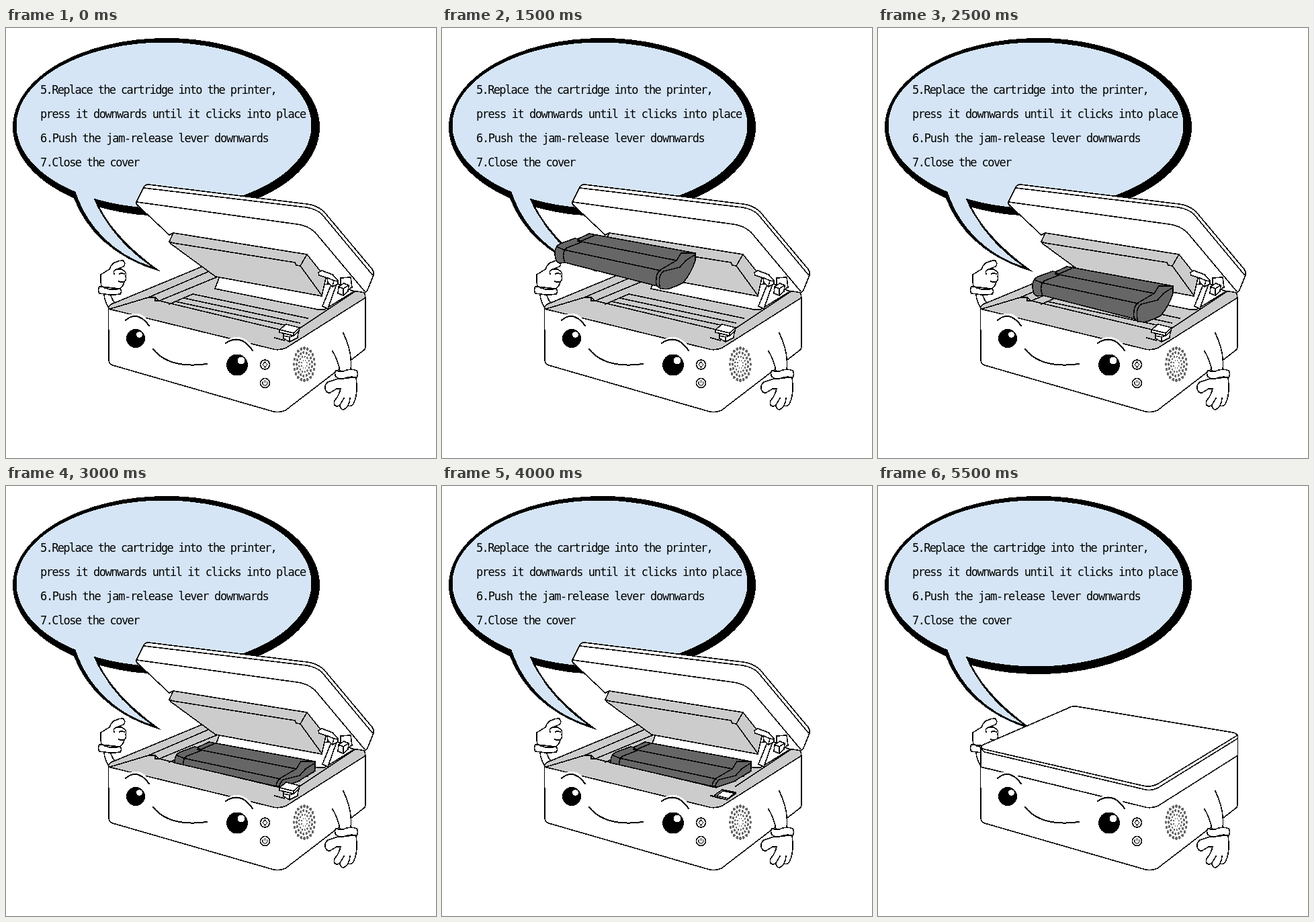
Write an HTML page that moves like this. It is 640 px wide and 640 px high and loops after 7.5 s.

```html
<!DOCTYPE html>
<html lang="en">
<head>
<meta charset="utf-8">
<title>Replacing the cartridge</title>
<style>
html, body { margin: 0; width: 100%; height: 100%; overflow: hidden; background: #fff; }
svg { display: block; width: 100vw; height: 100vh; shape-rendering: crispEdges; }
path, circle { fill: none; stroke: #000; stroke-width: 1.6; stroke-linejoin: round; stroke-linecap: round; }
.w { fill: #fff; }
.g { fill: #ccc; }
.d { fill: #666; }
.k { fill: #000; }
.flat { stroke: none; }
.sky { fill: #d5e5f5; stroke: none; }
.halo { stroke: #fff; stroke-width: 7; }
.brow { stroke-width: 2; }
.thin { stroke-width: 1; }
text { font: 17px "DejaVu Sans Mono", "Liberation Mono", monospace; fill: #000; }
</style>
</head>
<body>
<svg viewBox="0 0 640 640">
  <defs>
    <clipPath id="slot"><path d="M240 370H472V419L434 440L410 448L398 446L251 412L240 410Z"/></clipPath>
  </defs>

  <g id="bubble">
    <ellipse cx="238.5" cy="147.5" rx="228.5" ry="132.5"/>
    <path class="k flat" d="M97 242C112 291 151 340 231 363C190 334 157 301 140 268L128 252Z"/>
    <ellipse cx="235" cy="145" rx="219.5" ry="123.5" fill="#d5e5f5"/>
    <path class="sky" d="M101 238L104 245C118 289 155 335 216 355C174 326 146 290 130 253L132 240Z"/>
  </g>
  <g id="words"></g>

  <g id="leftArm">
    <path class="w flat" d="M146 396Q147 408 153 416L165 411Q158 403 157 396Z"/>
    <path d="M146 397Q147 407 152 415M156 398Q158 405 163 411"/>
    <path class="w" d="M142 385Q140 376 141 367L154 359Q157 351 162 349Q168 346 174 346Q179 350 175 355L163 360Q171 357 175 361Q180 364 178 370Q180 374 176 378Q175 384 169 388Z"/>
    <path d="M163 360Q159 362 161 366M176 366Q172 364 169 366M176 378Q171 379 168 377"/>
    <path class="w" d="M139 385Q144 384 147 387Q158 391 170 388Q173 392 170 396Q157 398 147 396L139 395Q136 390 139 385Z"/>
  </g>

  <path class="w" d="M152.500 418L153 494Q153 500 159 502L393 569.500Q405 574 416 569L532 480Q535 478 535 474V401L417 476Q405 481 394 477Z"/>

  <g id="open">
    <path class="g" d="M152.500 418Q152 414 157 411L297 353L318 369L520 392L531 393Q536 396 534 402L417 476Q405 481 394 477Z"/>
    <path d="M155 418L212 401L305 361M212 401H222L228 406L318 369M222 401V406H228"/>
    <path class="w" d="M318 370L311 388L464 419L474 419L518 392L496 378L462 384Z"/>
    <path class="g flat" d="M311 388L464 419L439 438L300 400Z"/>
    <path d="M228 406L408 449M243 411L278 396L449 432M252 407L419 443M265 402L437 439M311 388L464 419M518 393L437 447M400 461L414 465"/>

    <path class="w" d="M194 259L205 237Q207 233 212 233L448 262Q463 264 473 273L545 359Q548 363 547 368L538 390Q535 395 529 393L515 391L475 372L448 337L247 306L243 308L196 264Q193 262 194 259Z"/>
    <path d="M205 238L447 267Q461 269 470 277L545 367M195 259L433 292Q449 294 460 304L533 391"/>
    <path class="g" d="M249 305L448 337L476 372L470 399L312 370L245 321L243 318Z"/>
    <path d="M243 318L249 320L430 349L432 353L438 354L448 337M438 354L470 398"/>

    <path class="w" d="M484 382L471 414L479 418L491 384Z"/>
    <path class="w" d="M465 364L470 361L486 367L494 376V381L486 385L479 379L478 372L466 368Z"/>
    <path d="M479 372L488 376L494 377M488 376L486 384"/>
    <path class="w" d="M498 372L513 371L515 386L508 390L498 384Z"/>
    <path class="w" d="M495 385L503 380L510 383L509 392L502 398L494 395Z"/>
    <path d="M495 385L502 388L510 383M502 388V397"/>
  </g>

  <g id="cartSlot"><g id="cart">
    <path class="d" d="M105 301Q106 296 112 293L134 285L138 286L155 278L313 307V318Q307 337 295 351Q284 357 274 360Q262 362 256 356L119 321L111 322Q105 320 105 314Q103 307 105 301Z"/>
    <path d="M119 321Q113 307 122 299L143 291L138 286M108 298L117 302L261 333M138 289L285 318M162 281L141 290M255 355Q253 338 261 332L285 318L292 307L313 307M261 360Q256 341 266 334L290 328L299 318L313 309"/>
  </g></g>
  <path id="rim" d="M251 412L398 446L410 448L434 440L460 424"/>

  <g id="leverUp">
    <path class="w" d="M413 454V462L422 467L434 461L435 452L424 448Z"/>
    <path class="w" d="M407 449L417 441L437 446L436 451L428 458L407 453Z"/>
    <path d="M407 449L428 454L437 446M428 454V458M413 458L422 460V467M422 460L428 458"/>
  </g>
  <g id="leverDown">
    <path class="w" d="M406 460L417 452L437 456L426 465Z"/>
    <path d="M402 461L424 467L437 458M410 460L418 454L434 457"/>
  </g>
  <path id="click" d="M434 446L432 410M440 448L469 416M444 453L475 451"/>

  <g id="closed">
    <path class="w" d="M153 418V390Q153 387 157 385L282 331Q288 327 295 328L529 367Q535 369 535.500 373V401L417 476Q405 481 394 477Z"/>
    <path d="M154 388Q154 391 159 392L394 446Q406 449 417 443L535 371M153 391L159 396L394 451Q406 455 417 449L535 376"/>
  </g>

  <g id="face">
    <path class="halo" d="M179 434Q196 419 213 442M328 469Q349 454 367 479"/>
    <path class="brow" d="M178 435Q196 420 213 443M327 469Q349 454 367 480"/>
    <circle class="k flat" cx="193" cy="462" r="14"/>
    <circle class="w flat" cx="198.500" cy="456.500" r="4.500"/>
    <circle class="k flat" cx="344" cy="501.500" r="16"/>
    <circle class="w flat" cx="350" cy="495" r="5.500"/>
    <path class="brow" d="M219 478C236 499 263 505 299 500"/>
    <circle cx="385.500" cy="501" r="7"/>
    <circle cx="385.500" cy="528.500" r="7"/>
    <path class="thin" d="M385.500 497L389 501L385.500 505L382 501ZM383 526A3.500 3.500 0 1 0 388 526M385.500 524V528"/>
  </g>
  <g id="speaker" fill="#666"></g>

  <g id="rightArm">
    <path class="w flat" d="M502 454Q515 480 514 511L497 512Q494 495 486 481Z"/>
    <path d="M502 454Q516 483 513 509M486 481Q494 494 497 510"/>
    <path class="w" d="M494 522L479 527Q474 531 475 537Q477 544 482 543L492 537L498 537Q496 546 491 552Q487 557 489 561Q492 565 497 561Q497 567 502 568Q507 566 509 562Q516 564 518 557Q524 545 521 520Z"/>
    <path d="M497 561Q500 556 503 551M509 562Q512 556 512 551"/>
    <path class="w" d="M491 510Q500 513 507 509Q516 507 522 510Q525 515 522 520Q512 518 505 521Q497 524 491 519Q488 514 491 510Z"/>
  </g>
</svg>
<script>
const NS = "http://www.w3.org/2000/svg";
const $ = id => document.getElementById(id);
const add = (parent, tag, attrs) => {
  const el = document.createElementNS(NS, tag);
  for (const k in attrs) el.setAttribute(k, attrs[k]);
  return parent.appendChild(el);
};

// text, baseline, letter spacing
[
  ["5.Replace the cartridge into the printer,", 98, -1.67],
  ["press it downwards until it clicks into place", 134, -1.46],
  ["6.Push the jam-release lever downwards", 170, -1.3],
  ["7.Close the cover", 206, -1.6]
].forEach(([line, y, gap]) => {
  add($("words"), "text", { x: 51, y, "letter-spacing": gap }).textContent = line;
});

// rings: x radius, y radius, dots, dot size
[[15.5, 24, 20, 1.8], [11.5, 17.5, 17, 1.6], [7.8, 11.5, 13, 1.2], [4.2, 6, 8, 0.8]]
  .forEach(([rx, ry, n, r], ring) => {
    for (let i = 0; i < n; i++) {
      const a = (i + ring / 2) / n * 2 * Math.PI;
      add($("speaker"), "ellipse", {
        cx: 444 + rx * Math.cos(a), cy: 500.5 + ry * Math.sin(a), rx: r, ry: r * 1.35
      });
    }
  });

const LOOP = 7500, SEATED = 3000, PRESSED = 3500, CLOSED = 5500;
// start time, cartridge offset
const steps = [[1000, 0, 0], [1500, 64, 28], [2000, 105, 53], [2500, 126, 77], [SEATED, 147, 103]];
const show = (id, on) => { $(id).style.display = on ? "" : "none"; };

function draw(t) {
  const open = t < CLOSED;
  const step = steps.filter(s => t >= s[0]).pop();
  const seated = open && t >= SEATED;
  const down = t >= PRESSED;

  show("open", open);
  show("closed", !open);
  show("cart", open && step);
  show("rim", seated);
  show("leverUp", !down);
  show("leverDown", open && down);
  show("click", open && down && Math.floor((t - PRESSED) / 500) % 2 === 0);

  if (step) $("cart").setAttribute("transform", `translate(${step[1]} ${step[2]})`);
  if (seated) $("cartSlot").setAttribute("clip-path", "url(#slot)");
  else $("cartSlot").removeAttribute("clip-path");
}

const start = performance.now();
function tick() {
  draw((performance.now() - start) % LOOP);
  requestAnimationFrame(tick);
}
tick();
</script>
</body>
</html>
```
